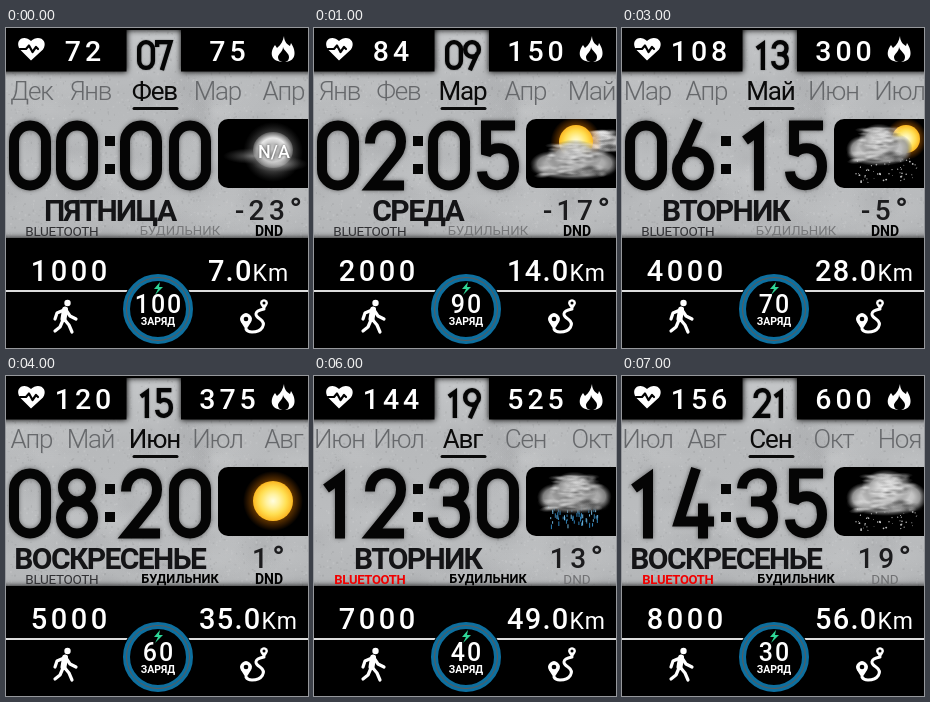
Recreate the animation shown at these times as an HTML page with a canvas. Size 302 px wide and 320 px high, loop 8000 ms.

```html
<!DOCTYPE html>
<html lang="ru">
<head>
<meta charset="utf-8">
<style>
html, body { margin: 0; height: 100%; overflow: hidden; background: #000; }
canvas { display: block; }
</style>
</head>
<body>
<canvas id="face" width="302" height="320"></canvas>
<script>
const ctx = document.getElementById('face').getContext('2d');
const MONTHS = ['Дек', 'Янв', 'Фев', 'Мар', 'Апр', 'Май', 'Июн', 'Июл', 'Авг', 'Сен', 'Окт', 'Ноя'];
const DAYS = ['ПЯТНИЦА', 'СРЕДА', 'ПЯТНИЦА', 'ВТОРНИК', 'ВОСКРЕСЕНЬЕ', 'ПЯТНИЦА', 'ВТОРНИК', 'ВОСКРЕСЕНЬЕ'];

// Narrow clock numerals: centre lines in a 42 x 70 cell
const DIGITS = [
  'M5 21a16 16 0 0 1 32 0V49a16 16 0 0 1-32 0Z',
  'M9 20L23 10V70',
  'M6 23C6-1 37-1 37 21C37 30 33 34 29 39L8 65H40',
  'M6 20C7 0 36 0 36 19C36 29 30 33 20 33H15M20 33C32 33 37 39 37 49C37 70 6 70 5 49',
  'M24 0L7 53H42M31 35V70',
  'M38 5H9V34C14 25 37 23 37 46C37 70 6 70 5 51',
  'M26 0L8 40M5 48a16 17 0 1 0 32 0a16 17 0 1 0-32 0',
  'M5 16V5H36L16 70',
  'M7 19a14 14 0 1 0 28 0a14 14 0 1 0-28 0M5 49a16 16 0 1 0 32 0a16 16 0 1 0-32 0',
  'M16 70L34 30M5 22a16 17 0 1 0 32 0a16 17 0 1 0-32 0'
].map(d => new Path2D(d));

let seed;
function random() {
  seed = (seed * 16807) % 2147483647;
  return seed / 2147483647;
}
const between = (a, b) => a + (b - a) * random();
const pad = n => String(n).padStart(2, '0');

function rect(x, y, w, h, color) {
  ctx.fillStyle = color;
  ctx.fillRect(x, y, w, h);
}

function shape(d, color, lineWidth = 0, x = 0, y = 0) {
  ctx.save();
  ctx.translate(x, y);
  ctx.fillStyle = ctx.strokeStyle = color;
  ctx.lineWidth = lineWidth;
  ctx.lineCap = ctx.lineJoin = 'round';
  if (lineWidth) ctx.stroke(new Path2D(d));
  else ctx.fill(new Path2D(d));
  ctx.restore();
}

function circle(x, y, r, color, lineWidth = 0) {
  ctx.beginPath();
  ctx.arc(x, y, r, 0, 7);
  ctx.fillStyle = ctx.strokeStyle = color;
  ctx.lineWidth = lineWidth;
  if (lineWidth) ctx.stroke();
  else ctx.fill();
}

function glow(x, y, rx, ry, ...colors) {
  ctx.save();
  ctx.translate(x, y);
  ctx.scale(1, ry / rx);
  const g = ctx.createRadialGradient(0, 0, 0, 0, 0, rx);
  colors.forEach((c, i) => g.addColorStop(i / (colors.length - 1), c));
  circle(0, 0, rx, g);
  ctx.restore();
}

// Runs of [text, font] centred together on x
function text(x, y, color, spacing, ...runs) {
  ctx.letterSpacing = spacing + 'px';
  const widths = runs.map(([s, font]) => {
    ctx.font = font + ' Roboto, sans-serif';
    return ctx.measureText(s).width;
  });
  x -= (widths.reduce((a, b) => a + b) - spacing) / 2;
  ctx.fillStyle = color;
  runs.forEach(([s, font], i) => {
    ctx.font = font + ' Roboto, sans-serif';
    ctx.fillText(s, x, y);
    x += widths[i];
  });
}

function numeral(n, x, y, scale) {
  ctx.save();
  ctx.translate(x, y);
  ctx.scale(scale, scale);
  ctx.lineWidth = 10;
  ctx.miterLimit = 3;
  ctx.strokeStyle = '#050505';
  ctx.shadowColor = 'rgba(0,0,0,.5)';
  ctx.shadowBlur = 4 * scale;
  ctx.stroke(DIGITS[n]);
  ctx.restore();
}

function panel() {
  const g = ctx.createLinearGradient(0, 0, 0, 210);
  g.addColorStop(0, '#c6c8ca');
  g.addColorStop(.3, '#b7b9bb');
  g.addColorStop(.7, '#bbbdbf');
  g.addColorStop(1, '#b4b6b8');
  rect(0, 0, 302, 210, g);
  seed = 77;
  for (let i = 0; i < 50; i++) {
    const c = random() < .5 ? '255,255,255' : '70,70,75';
    glow(between(0, 302), between(45, 210), between(12, 40), between(8, 26), `rgba(${c},.07)`, `rgba(${c},0)`);
  }
  for (let i = 0; i < 2000; i++) {
    rect(between(0, 302), between(0, 210), between(.5, 2), between(.5, 2.5),
      random() < .5 ? 'rgba(255,255,255,.11)' : 'rgba(40,40,45,.08)');
  }
  ctx.save();
  ctx.shadowColor = '#000';
  ctx.shadowBlur = 6;
  rect(-10, -10, 130.5, 53.5, '#000');
  rect(175, -10, 137, 53.5, '#000');
  rect(-10, 210, 322, 120, '#000');
  rect(100, -10, 100, 12, '#000');
  ctx.restore();
}

function pin(x, y, r) {
  shape(`M0 ${r * 1.9}L${-r * .85} ${r * .55}A${r} ${r} 0 1 1 ${r * .85} ${r * .55}Z`, '#fff', 0, x, y);
  circle(x, y, r * .4, '#000');
}

function icons() {
  shape('M25 32.5L14 21.5C8 12 18 6 25 13C32 6 43 12 37 21.5Z', '#fff');
  shape('M14 21H20L23 17.5L26.5 24L30 19L32 21', '#000', 2.2);
  shape('M278 8C278 14 282 17 284 18L285 15C291 24 290 34 278 34C265 34 263 25 269 17L271 20C275 17 277 13 278 8Z', '#fff');
  shape('M277 19C278 23 283 25 283 29C283 32 281 34 278 34C274 34 272 32 272 29C272 26 277 24 277 19Z', '#000');
  circle(61.5, 275, 3.2, '#fff');
  shape('M58 282L51 285L49 291M60 282L64 288L70 291M58 291L63 297L66 304M57 292L54 299L49 303', '#fff', 3.2);
  shape('M59 281.5L57.5 291', '#fff', 6);
  shape('M258 281C247 283 249 288 254 291C261 296 256 304 246 304C243 304 241 303 240 301', '#fff', 3);
  pin(258, 275, 3.8);
  pin(240, 291, 5.8);
}

function sun(x, y, r) {
  glow(x, y, r * 1.5, r * 1.5, 'rgba(255,170,0,.9)', 'rgba(255,150,0,.55)', 'rgba(255,120,0,0)');
  glow(x, y, r, r, '#fffde0', '#fff2a0', '#ffdf52', '#fbb620');
}

// Dome of soft puffs with a bright top, a shaded base and flat wisps
function cloud(x, y, w, h, tone) {
  const gray = (v, a) => `rgba(${v},${v},${v},${a})`;
  for (const [dx, dy, rx, ry] of [[0, .22, .5, .28], [-.25, .1, .25, .33], [.26, .08, .25, .34], [0, -.08, .32, .43]]) {
    const v = tone - dy * 120;
    glow(x + dx * w, y + dy * h, rx * w, ry * h, gray(v, 1), gray(v * .95, 1), gray(v * .8, .9), gray(v * .5, 0));
  }
  seed = 19;
  for (let i = 0; i < 90; i++) {
    const dy = between(-.4, .4);
    const reach = .24 + .2 * (dy + .4);
    const v = random() < .65 - dy ? 250 : 55;
    glow(x + between(-reach, reach) * w, y + dy * h, between(4, 11), between(1.5, 3.5), gray(v, .32), gray(v, 0));
  }
}

function rain() {
  seed = 31;
  for (let i = 0; i < 70; i++) {
    rect(between(234, 284), between(127, 149), 1, between(2, 5), random() < .6 ? '#2f7fb4' : '#70b2d8');
  }
}

function snow() {
  seed = 43;
  for (let i = 0; i < 60; i++) {
    circle(between(234, 296), between(128, 155), between(.4, 1), 'rgba(255,255,255,.75)');
  }
}

const WEATHER = [
  () => {
    glow(267, 124, 30, 30, '#ddd', 'rgba(150,150,150,.6)', 'rgba(80,80,80,0)');
    glow(267, 122, 20, 18, '#d8d8d8', '#bdbdbd', '#e8e8e8', 'rgba(190,190,190,.3)');
    glow(247, 128, 30, 8, 'rgba(170,170,170,.6)', 'rgba(120,120,120,0)');
    glow(274, 136, 28, 8, 'rgba(190,190,190,.6)', 'rgba(120,120,120,0)');
    ctx.save();
    ctx.shadowColor = '#333';
    ctx.shadowBlur = 3;
    text(268, 130, '#fff', 0, ['N/A', '500 18px']);
    ctx.restore();
  },
  () => { cloud(288, 113, 42, 24, 200); sun(262, 114, 17); cloud(260, 132, 88, 40, 190); },
  () => { sun(284, 111, 14); rain(); cloud(257, 117, 66, 42, 190); },
  () => { sun(284, 111, 14); snow(); cloud(257, 117, 66, 42, 205); },
  () => sun(267, 125, 20),
  () => { cloud(290, 104, 38, 22, 190); cloud(259, 123, 80, 44, 190); },
  () => { rain(); cloud(260, 117, 74, 42, 185); },
  () => { snow(); cloud(264, 117, 80, 46, 215); }
];

function draw(i) {
  panel();

  const day = pad(7 + 2 * i);
  numeral(day[0], 131, 12, .43);
  numeral(day[1], 149, 12, .43);
  [26, 85, 149, 212, 278].forEach((x, k) =>
    text(x, 72, k === 2 ? '#0a0a0a' : '#66686b', -1.2, [MONTHS[(i + k) % 12], k === 2 ? '400 26px' : '300 26px']));
  shape('M128 80.5H171', '#0a0a0a', 3);

  const clock = pad(2 * i) + pad(5 * i);
  [3, 50, 114, 163].forEach((x, k) => numeral(clock[k], x, 92.5, 1));
  rect(99, 108, 10, 10, '#050505');
  rect(99, 136, 10, 10, '#050505');

  ctx.save();
  ctx.beginPath();
  ctx.roundRect(212, 91, 100, 69, 10);
  ctx.fillStyle = '#000';
  ctx.fill();
  ctx.clip();
  WEATHER[i]();
  ctx.restore();

  text(104.5, 192.5, '#141416', -1.6, [DAYS[i], '600 30px']);
  text(262.5, 192, '#1c1c1e', 4.5, [String(6 * i - 23), '500 28px'], ['°', '900 32px']);
  const disconnected = i > 4;
  text(56, 208, disconnected ? '#f00000' : '#303033', -.3, ['BLUETOOTH', disconnected ? '700 13px' : '400 13.5px']);
  text(174, 207, i > 3 ? '#000' : '#77787a', 0, ['БУДИЛЬНИК', i > 3 ? '700 12.8px' : '400 13.2px']);
  text(263, 207.5, disconnected ? '#707173' : '#000', 0, ['DND', disconnected ? '400 13.5px' : '700 14px']);

  icons();
  text(77, 32.5, '#fff', 4, [String(72 + 12 * i), '500 28.5px']);
  text(221.5, 32.5, '#fff', 4, [String(75 + 75 * i), '500 28.5px']);
  text(63, 253, '#fff', 3.5, [String(1000 * (i + 1)), '500 29px']);
  text(242, 253, '#fff', 1.2, [(7 * (i + 1)).toFixed(1), '500 29px'], ['Km', '400 23px']);

  rect(0, 262, 302, 2, '#ddd');
  circle(152, 281, 36, '#000');
  circle(152, 281, 31.5, '#0d6f9f', 7);
  circle(152, 281, 31.5, '#5d5a58', 1);
  shape('M154 254L148 261H152L149 267L157 259H153Z', '#2fd596');
  text(152, 285, '#fff', 2, [String(100 - 10 * i), '500 25px']);
  text(152, 297, '#fff', 0, ['ЗАРЯД', '700 10.5px']);
}

let shown = -1;
function tick() {
  const step = Math.floor(performance.now() / 1000) % 8;
  if (step !== shown) draw(shown = step);
  requestAnimationFrame(tick);
}
tick();
</script>
</body>
</html>
```
